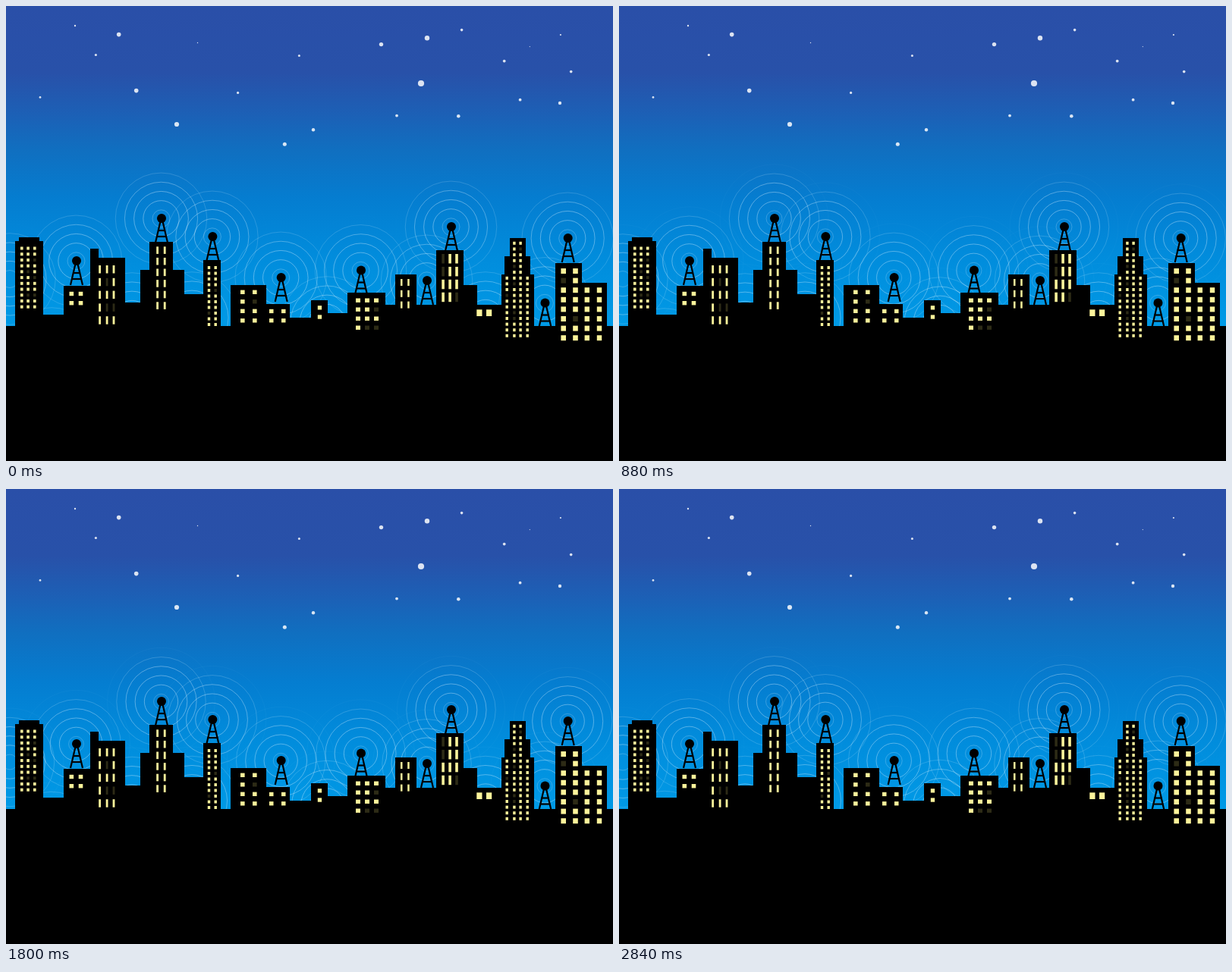
Animation, 800 px wide and 600 px high, one loop 2.88 s. Source, as an HTML page:

```html
<!DOCTYPE html>
<html lang="en">
<head>
<meta charset="utf-8">
<title>City at night</title>
<style>
  html, body { margin: 0; width: 100%; height: 100%; overflow: hidden; background: #000; }
  svg { display: block; width: 100vw; height: 100vh; }
</style>
</head>
<body>
<svg viewBox="0 0 800 600">
  <defs>
    <linearGradient id="sky" gradientUnits="userSpaceOnUse" x1="0" y1="0" x2="0" y2="422">
      <stop offset="0" stop-color="#2a4fa8"/>
      <stop offset=".21" stop-color="#2851a9"/>
      <stop offset=".33" stop-color="#1d5fb5"/>
      <stop offset=".45" stop-color="#106fc0"/>
      <stop offset=".6" stop-color="#057dd0"/>
      <stop offset=".78" stop-color="#018cdc"/>
      <stop offset="1" stop-color="#009ae6"/>
    </linearGradient>
  </defs>
  <rect width="800" height="600" fill="url(#sky)"/>
  <g id="stars" fill="#fff" fill-opacity=".84"/>
  <g id="rings" fill="none" stroke="#dff2ff"/>
  <path id="meteor" fill="none" stroke="#fff" stroke-width="3" stroke-linecap="round"/>
  <g id="city"/>
  <g id="masts" stroke="#000" stroke-width="2.2"/>
  <g id="windows"/>
</svg>
<script>
const LOOP = 2880, STEP = 40, PULSE = 960, GAP = 12.2, RINGS = 6;
const $ = id => document.getElementById(id);

function add(parent, tag, attrs = {}) {
  const el = document.createElementNS('http://www.w3.org/2000/svg', tag);
  for (const k in attrs) el.setAttribute(k, attrs[k]);
  parent.appendChild(el);
  return el;
}

// Stars: x, y, radius
const stars = [
  [91, 26, 1.2], [148.7, 37.6, 2.8], [118.4, 64.5, 1.6], [252.5, 48.5, 0.7],
  [171.7, 111.6, 2.8], [45, 120.4, 1.4], [225, 156, 3.1], [305.6, 114.4, 1.6],
  [386.4, 65.6, 1.5], [367.3, 182.3, 2.5], [405, 163.2, 2.2], [494.5, 50.6, 2.7],
  [555, 42.2, 3.2], [600.6, 31.6, 1.8], [547, 102, 4.1], [515, 144.6, 1.9],
  [596.3, 145.2, 2.3], [656.7, 72.6, 1.9], [690.3, 53.6, 0.6], [730.9, 38, 1.1],
  [744.7, 86.6, 1.8], [677.6, 123.7, 1.9], [730, 128, 2.2]
];
for (const [cx, cy, r] of stars) add($('stars'), 'circle', { cx, cy, r });

// Building blocks: left, right, roof
function block(left, right, roof) {
  add($('city'), 'rect', { x: left, y: roof, width: right - left, height: 600 - roof });
}
block(0, 800, 422);
block(12, 49, 310);
block(17, 44, 305);
block(49, 76, 407);
block(76, 111, 369);
block(111, 122, 320);
block(111, 157, 332);
block(157, 177, 391);
block(177, 235, 348);
block(189, 220, 311);
block(235, 260, 380);
block(260, 283, 335);
block(296, 343, 368);
block(343, 374, 393);
block(374, 450, 411);
block(402, 424, 388);
block(424, 450, 405);
block(450, 500, 378);
block(500, 653, 394);
block(513, 541, 354);
block(567, 603, 322);
block(603, 621, 368);
block(653, 696, 354);
block(657, 691, 330);
block(664, 685, 306);
block(724, 759, 339);
block(759, 792, 365);

const masts = [
  [93, 336], [205, 280], [272.4, 304], [362.7, 358], [468, 348.5],
  [555, 362], [587, 291], [710.5, 391.5], [740.7, 306]
];
for (const [x, y] of masts) {
  const line = (xa, ya, xb, yb) =>
    add($('masts'), 'line', { x1: x + xa, y1: y + ya, x2: x + xb, y2: y + yb });
  add($('masts'), 'circle', { cx: x, cy: y, r: 6, stroke: 'none' });
  line(-8, 32, -1.5, 4);
  line(8, 32, 1.5, 4);
  line(-5, 16, 5, 16);
  line(-7, 24, 7, 24);
}

// Signals whose masts stand behind the skyline
const hidden = [[5, 360], [60, 458], [166, 412], [245, 411], [423, 417], [632, 411]];
const sources = masts.map(([x, y]) => [x - 0.5, y + 0.3]).concat(hidden);
const rings = Array.from({ length: RINGS }, () => {
  const g = add($('rings'), 'g');
  return { g, circles: sources.map(([cx, cy]) => add(g, 'circle', { cx, cy })) };
});

// Window grid; unlit panes are [row, column] pairs
function grid(xs, y, rows, pitch, w, h, unlit = []) {
  for (let row = 0; row < rows; row++) {
    xs.forEach((x, col) => {
      const dark = unlit.some(([r, c]) => r === row && c === col);
      add($('windows'), 'rect', {
        x, y: y + row * pitch, width: w, height: h, fill: dark ? '#2d2b16' : '#fdf49b'
      });
    });
  }
}
grid([19, 27.3, 36], 317.5, 11, 7.72, 3.6, 4, [[2, 2], [4, 1], [5, 2], [8, 1], [8, 2]]);
grid([83.5, 95.7], 376.8, 2, 12.2, 5.6, 5.4);
grid([122.2, 131.7, 140.6], 342, 5, 16.8, 2.8, 10.5, [[1, 1], [3, 1], [3, 2]]);
grid([198.2, 207.8], 317.3, 6, 14.6, 2.8, 9.6);
grid([265.8, 274.5], 343, 11, 7.5, 3.4, 4, [[4, 1], [8, 0]]);
grid([309, 325], 374.6, 4, 12.5, 5.6, 5.4, [[1, 1]]);
grid([347, 363], 399.8, 2, 12.3, 5.5, 5.3);
grid([410.8], 395.2, 2, 12.2, 5.3, 5.3);
grid([461, 473, 485], 385.5, 4, 12, 6, 5.4, [[1, 2], [3, 1], [3, 2]]);
grid([520, 529.2], 360, 3, 14.8, 2.5, 9);
grid([574.3, 583.3, 592.2], 327, 4, 16.9, 3.6, 12.5, [[0, 0], [1, 0], [3, 2]]);
grid([620.3, 633], 400.3, 1, 0, 7.2, 8.7);
grid([668.2, 676.4], 310.8, 6, 7.65, 3.4, 4, [[1, 1], [4, 0]]);
grid([658.5, 668.2, 676.4, 685.5], 356.8, 11, 7.6, 3.4, 4, [[1, 1], [3, 0], [6, 1], [7, 1]]);
grid([731.4, 747.2], 346, 8, 12.6, 6.6, 7, [[1, 0], [5, 1]]);
grid([762.6, 778.8], 371.2, 6, 12.6, 6.4, 7);

// Parabolic track of the shooting star
const trackY = x => 32 + 0.199 * (x - 87) + 0.00047 * (x - 87) ** 2;
const slope = x => 0.199 + 0.00094 * (x - 87);

function drawMeteor(t) {
  const meteor = $('meteor');
  const on = t >= 2065 && t < 2660;
  meteor.setAttribute('visibility', on ? 'visible' : 'hidden');
  if (!on) return;
  const tail = 88.5 + 1.265 * (t - 2120);
  const head = 128.5 + 1.475 * (t - 2120);
  const half = (head - tail) / 2;
  const bend = [tail + half, trackY(tail) + slope(tail) * half];
  const d = ['M', tail, trackY(tail), 'Q', ...bend, head, trackY(head)];
  meteor.setAttribute('d', d.join(' '));
  meteor.setAttribute('stroke-opacity', 0.86 - 0.0003 * (t - 2120));
}

function draw(t) {
  const phase = (t / PULSE + 0.94) % 1;
  rings.forEach(({ g, circles }, k) => {
    const r = GAP * (k + phase);
    g.setAttribute('stroke-opacity', Math.max(0, Math.min(0.38, r / 45, (73.2 - r) / 75)));
    for (const c of circles) c.setAttribute('r', r);
  });
  drawMeteor(t);
}

const start = performance.now();
function tick() {
  const t = (performance.now() - start) % LOOP;
  draw(Math.floor(t / STEP) * STEP);
  requestAnimationFrame(tick);
}
tick();
</script>
</body>
</html>
```
